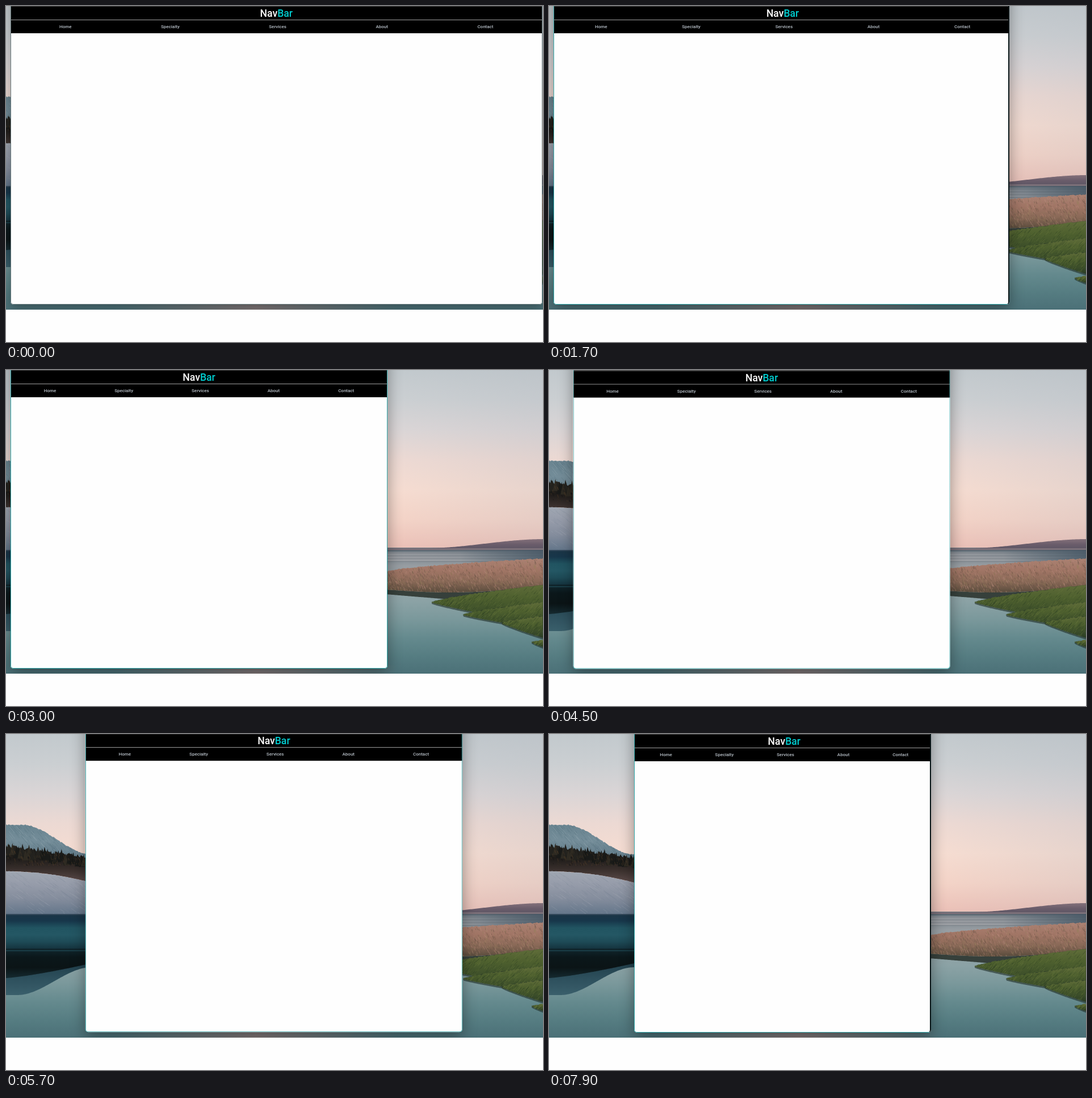
Write an HTML page with a canvas that moves like this. It is 946 px wide and 592 px high and loops after 8 s.

```html
<!DOCTYPE html>
<html lang="en">
<head>
<meta charset="utf-8">
<title>NavBar</title>
<style>
  html, body { margin: 0; width: 100%; height: 100%; overflow: hidden; background: #fefefe; }
  #desk { position: absolute; left: 0; top: 0; width: 946px; height: 535px; overflow: hidden; }
  canvas { position: absolute; left: 0; top: 0; }
  #win {
    position: absolute; left: 0; top: -30px; height: 556px; border-radius: 0 0 5px 5px;
    box-shadow: 0 6px 20px rgba(0, 0, 0, .32);
    font-family: Roboto, Arial, sans-serif; font-weight: 500;
  }
  #win.active { box-shadow: 0 7px 26px rgba(0, 0, 0, .38); }
  #view { position: absolute; inset: 0; overflow: hidden; border-radius: inherit; background: #fefefe; }
  #page { position: absolute; left: 0; top: 0; }
  .chrome { height: 31px; background: #484848; }
  .logo { height: 23px; line-height: 24px; background: #000; color: #fff; font-size: 17.6px; text-align: center; border-bottom: 1px solid #a0a0a0; }
  .logo span { color: #00ced1; }
  nav {
    display: flex; justify-content: space-around; box-sizing: border-box; padding: 0 7.25px;
    height: 23px; line-height: 23px; background: #000; color: #b9c1c9; font-size: 8px; white-space: nowrap;
  }
  #edge {
    position: absolute; inset: 0; box-sizing: border-box; border-radius: inherit;
    border: solid #66787b; border-width: 0 1px 1px;
  }
  .active #edge { border-color: #35adaf; }
  .sizing #edge { border-right: 2px solid #071416; }
</style>
</head>
<body>
<div id="desk">
  <canvas id="scene" width="946" height="535"></canvas>
  <div id="win">
    <div id="view">
      <div id="page">
        <div class="chrome"></div>
        <div class="logo">Nav<span>Bar</span></div>
        <nav><span>Home</span><span>Specialty</span><span>Services</span><span>About</span><span>Contact</span></nav>
      </div>
    </div>
    <div id="edge"></div>
  </div>
</div>
<script>
const W = 946, H = 535, LOOP = 8000, STEP = 100;
const ctx = document.getElementById('scene').getContext('2d');

let seed = 7;
const rnd = () => (seed = (seed * 16807) % 2147483647) / 2147483647;
const pick = list => list[Math.floor(rnd() * list.length)];

const mix = (a, b, p) => a + (b - a) * p;
const part = (x, a, b) => Math.min(1, Math.max(0, (x - a) / (b - a)));
const smooth = p => p * p * (3 - 2 * p);

// Land edges are functions of x
const flat = y => () => y;
const curve = (x0, y0, x1, y1, pow = 1) => x => mix(y0, y1, part(x, x0, x1) ** pow);
const swell = (x0, y0, x1, y1) => x => mix(y0, y1, smooth(part(x, x0, x1)));

function grad(y0, y1, ...colors) {
  const g = ctx.createLinearGradient(0, y0, 0, y1);
  colors.forEach((c, i) => g.addColorStop(i / (colors.length - 1), c));
  return g;
}

function across(x0, x1, ...colors) {
  const g = ctx.createLinearGradient(x0, 0, x1, 0);
  colors.forEach((c, i) => g.addColorStop(i / (colors.length - 1), c));
  return g;
}

function band(x, y, w, h, fill) {
  ctx.fillStyle = fill;
  ctx.fillRect(x, y, w, h);
}

// Area between two edges, the upper one optionally rough
function land(x0, x1, top, low, fill, rough = 0) {
  ctx.beginPath();
  for (let x = x0; x <= x1; x += 2) ctx.lineTo(x, top(x) + (rnd() - .5) * rough);
  for (let x = x1; x >= x0; x -= 2) ctx.lineTo(x, low(x));
  ctx.fillStyle = fill;
  ctx.fill();
}

// Short strokes scattered between two edges
function blades(x0, x1, top, low, count, len, lean, colors, alpha) {
  ctx.globalAlpha = alpha;
  for (let i = 0; i < count; i++) {
    const x = mix(x0, x1, rnd()), y = mix(top(x), low(x), rnd());
    const l = Math.min(len * (.5 + rnd()), low(x) - y);
    ctx.strokeStyle = pick(colors);
    ctx.beginPath();
    ctx.moveTo(x, y);
    ctx.lineTo(x + lean * l, y + l);
    ctx.stroke();
  }
  ctx.globalAlpha = 1;
}

function sky() {
  band(0, 0, W, 316, grad(0, 316, '#c2c9cd', '#cbcfd2', '#dad5d6', '#ecd9d3', '#f5dcd1', '#f3d3c7', '#eabfb6'));
  band(700, 0, W - 700, 316, across(700, W, 'rgba(170,175,185,0)', 'rgba(170,175,185,.18)'));
}

function water() {
  band(0, 313, W, H - 313, grad(313, H, '#66727c', '#979da2', '#94a4a7', '#8ba2a5', '#7a989b', '#658a8e', '#567d82', '#4b7077'));
  band(190, 520, 500, 15, across(190, 690, 'rgba(134,120,120,0)', 'rgba(134,120,120,.9)', 'rgba(134,120,120,0)'));
}

function leftShore() {
  const R = 200, lake = 317;
  const peak = swell(30, 160, 150, 212), woods = curve(0, 197, 150, 218);
  const snow = curve(0, 242, 150, 262, 2), shore = flat(lake);
  land(0, R, peak, flat(240), grad(157, 220, '#68838f', '#748d99', '#617a88'), 2);
  blades(0, R, peak, woods, 200, 7, .8, ['#9aabb5', '#4a6674', '#556f7d'], .35);
  land(0, R, woods, snow, grad(195, 262, '#262521', '#1c1a18', '#3a302d', '#5d4c4b'), 6);
  for (let x = 0; x < R; x += 3 + rnd() * 5) {
    const y = woods(x) - 4 + rnd() * 8;
    ctx.fillStyle = pick(['#23221e', '#2e2a22', '#191a18']);
    ctx.beginPath();
    ctx.moveTo(x, y - 4);
    ctx.lineTo(x + 5, y + 17);
    ctx.lineTo(x - 5, y + 17);
    ctx.fill();
  }
  blades(0, R, woods, flat(232), 220, 4, .3, ['#5a4128', '#11110f', '#3d3322'], .5);
  land(0, R, snow, shore, grad(241, lake, '#a0a7b2', '#959ba9', '#838c9c', '#64768a'), 1);
  blades(0, R, snow, shore, 260, 7, 1.4, ['#b3b6c0', '#6f7c8f', '#7d8797'], .22);

  const shade = curve(0, 430, 150, 404, 1.3), mirror = swell(20, 460, 150, 411);
  land(0, R, shore, mirror, grad(400, 460, '#1f3d49', '#2d4f5c', '#3a5f6b'));
  land(0, R, flat(375), shade, grad(375, 430, '#122a32', '#0b171a', '#0b1416', '#152a30'), 0);
  band(0, lake, R, 61, grad(lake, 378, '#1b3546', '#17364a', '#215461', '#245764', '#1e4b57', '#15343f'));
  band(0, lake, R, 2, '#33485a');
  band(0, 381, R, 1.5, '#1d444e');
}

function rightShore() {
  const L = 560, span = W - L;
  land(740, W, swell(740, 314, W, 298), flat(316), grad(298, 316, '#83707a', '#6b5d6b', '#5c5564'));
  band(L, 314, span, 3, '#7c7079');
  band(L, 317, span, 2, '#5d6872');
  band(L, 321, span, 16, across(L, W, 'rgba(172,170,173,.6)', 'rgba(172,170,173,.45)', 'rgba(172,170,173,0)'));
  band(800, 317, W - 800, 22, across(800, W, 'rgba(62,80,95,0)', 'rgba(62,80,95,.7)'));
  for (let y = 322; y < 340; y += 5) band(L, y, span, 1, 'rgba(75,85,95,.3)');

  const reeds = curve(660, 358, W, 332, .6);
  const bank = x => 387 + 5 * Math.sin((x - 672) / 70);
  land(L, W, bank, curve(L, 386, 790, 405), '#36403b');
  land(L, W, reeds, bank, grad(334, 392, '#aa8071', '#a07565', '#896957', '#594b3c'), 2);
  blades(L, W, reeds, bank, 1500, 4, .4, ['#bd9080', '#775a4b', '#ab7d6c', '#5b4d3f', '#94805c'], .45);

  // Grassy spits, each with tip x, tip y and depth at the far side
  for (const [x, y, depth] of [[750, 409, 40], [805, 431, 26], [873, 445, 27], [926, 479, 9]]) {
    const rise = y - (W - x) * .155;
    const top = curve(x, y, W, rise, .75), low = curve(x, y, W, y + depth, .85);
    land(x, W, top, v => low(v) + 3, 'rgba(30,44,38,.6)');
    land(x, W, top, low, grad(rise, y + depth, '#5f6c39', '#4d5f2e', '#3d4f2a', '#2b3c26'), 2);
    blades(x, W, top, low, (W - x) * 2.4, 5, -.9, ['#6e7a3e', '#344825', '#586a32', '#283a22'], .45);
  }
}

sky();
water();
leftShore();
rightShore();

// Window drag: time, x, y
const path = [[4100, 8, 0], [4500, 42.6, .6], [5100, 115, -1.7], [5800, 144, -.7], [6500, 150, 0]];

function along(t, axis) {
  const i = path.findIndex(p => t < p[0]);
  if (i < 1) return path[i < 0 ? path.length - 1 : 0][axis];
  const a = path[i - 1], b = path[i];
  return mix(a[axis], b[axis], part(t, a[0], b[0]));
}

// A steady narrowing, then a quick one that eases out
function widthAt(t) {
  const first = mix(936.5, 664, part(t, 450, 3000));
  return first - 147 * (1 - (1 - part(t, 7500, 8000)) ** 2);
}

const win = document.getElementById('win'), page = document.getElementById('page');

function draw(now) {
  const t = Math.floor((now % LOOP) / STEP) * STEP;
  const sizing = (t >= 500 && t < 3000) || t >= 7600;
  win.classList.toggle('active', t >= 500);
  win.classList.toggle('sizing', sizing);
  win.style.transform = `translate(${along(t, 1)}px, ${along(t, 2)}px)`;
  win.style.width = widthAt(t) + 'px';
  // The page layout trails the window edge while it is dragged
  page.style.width = widthAt(sizing ? t - 40 : t) + 'px';
}

const start = performance.now();
function tick() {
  draw(performance.now() - start);
  requestAnimationFrame(tick);
}
draw(0);
requestAnimationFrame(tick);
</script>
</body>
</html>
```
